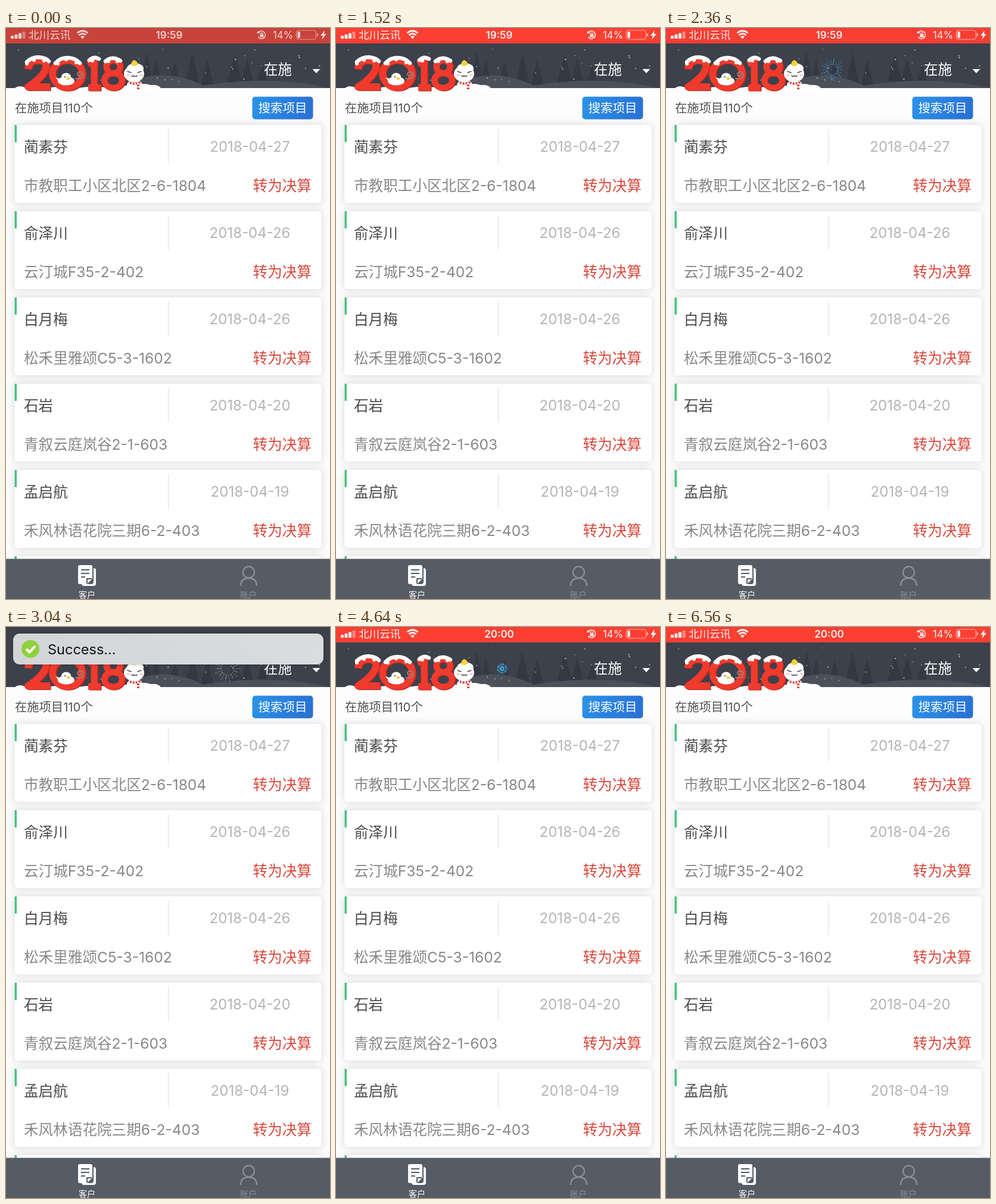
Recreate the animation shown at these times as an HTML page with a canvas. Size 544 by 960 pixels, loop 6.6 s.

```html
<!DOCTYPE html>
<html lang="zh">
<head>
<meta charset="utf-8">
<style>
html, body { margin: 0; width: 100%; height: 100%; overflow: hidden; background: #fdfdfd; }
canvas { display: block; }
</style>
</head>
<body>
<canvas width="544" height="960"></canvas>
<script>
const g = document.querySelector('canvas').getContext('2d');
const LOOP = 6600, TAU = Math.PI * 2;
const FONT = "Inter, 'Noto Sans CJK SC', 'Noto Sans CJK', sans-serif";
const projects = [
  ['蔺素芬', '2018-04-27', '市教职工小区北区2-6-1804'],
  ['俞泽川', '2018-04-26', '云汀城F35-2-402'],
  ['白月梅', '2018-04-26', '松禾里雅颂C5-3-1602'],
  ['石岩', '2018-04-20', '青叙云庭岚谷2-1-603'],
  ['孟启航', '2018-04-19', '禾风林语花院三期6-2-403']
];

const clamp = x => Math.max(0, Math.min(1, x));
const ease = x => x < .5 ? 2 * x * x : 1 - 2 * (1 - x) ** 2;
const rand = n => { const s = Math.sin(n * 127.1) * 43758.5; return s - Math.floor(s); };

function text(s, x, y, size, color, align = 'left', weight = 400) {
  g.font = `${weight} ${size}px ${FONT}`;
  g.fillStyle = color;
  g.textAlign = align;
  g.fillText(s, x, y);
}
function rect(x, y, w, h, color, r = 0) {
  g.fillStyle = color;
  g.beginPath();
  g.roundRect(x, y, w, h, r);
  g.fill();
}
function oval(x, y, rx, ry, color) {
  g.fillStyle = color;
  g.beginPath();
  g.ellipse(x, y, rx, ry, 0, 0, TAU);
  g.fill();
}
function fill(d, color) {
  g.fillStyle = color;
  g.fill(new Path2D(d));
}
function line(d, color, width) {
  g.strokeStyle = color;
  g.lineWidth = width;
  g.stroke(new Path2D(d));
}

function status(t, alpha) {
  const glow = clamp(t / 500);
  g.globalAlpha = alpha;
  rect(0, 0, 544, 26, `rgb(${200 + 53 * glow}, ${67 - 4 * glow}, ${59 - 9 * glow})`);
  g.globalAlpha = alpha * (.75 + .2 * glow);
  for (let i = 0; i < 4; i++)
    rect(8 + i * 6.5, 13 - i * 2.3, 5, 5 + i * 2.3, i < 3 ? '#fff' : '#ffffff70', 1);
  text('北川云讯', 38, 18, 17.6, '#fff');
  line('M119.500 8.500Q128.500 1 137.500 8.500M122.500 12Q128.500 7 134.500 12', '#fff', 2.8);
  fill('M125 14.500Q128.500 11.500 132 14.500L128.500 18.500Z', '#fff');
  text(t < 3500 ? '19:59' : '20:00', 274, 17.5, 17, '#fff', 'center', 600);
  line('M423.500 8A6.500 6.500 0 1 1 423.500 15', '#fff', 1.6);
  fill('M421 9H427L423 5Z', '#fff');
  rect(426.5, 10.5, 6, 5, '#fff', 1);
  line('M427.700 11V9Q429.500 6.500 431.300 9V11', '#fff', 1.2);
  text('14%', 448, 18, 16.8, '#fff');
  g.strokeStyle = '#ffffffa0';
  g.lineWidth = 1.2;
  g.beginPath();
  g.roundRect(487.5, 4, 33, 15, 4);
  g.stroke();
  rect(489.5, 6, 4.5, 11, '#fff', 2);
  rect(522, 9, 2, 5, '#ffffffa0', 1);
  fill('M535 4L528 13H532L530 20L538 10H534Z', '#fff');
  g.globalAlpha = 1;
}

function scenery() {
  rect(0, 0, 544, 101, '#3c414b');
  for (const [x, y, w] of [[236, 40, 24], [252, 52, 22], [283, 55, 22], [313, 41, 26],
                           [338, 53, 24], [384, 44, 30], [405, 52, 26], [430, 62, 24]])
    fill(`M${x} ${y}L${x + w / 2} 101H${x - w / 2}Z`, '#333842');
  fill('M190 101Q260 58 340 101ZM310 101Q430 76 544 101Z', '#4b5059');
  for (let i = 0; i < 34; i++) {
    const r = .6 + rand(i + 90) * .7;
    oval(8 + rand(i + 1) * 528, 32 + rand(i + 50) * 60, r, r, '#ffffffa0');
  }
}

// Each burst opens from its centre, then thins out into loose sparks.
function burst(x, y, size, start, life, colors, t) {
  const p = (t % 2540 - start) / life;
  if (p <= 0 || p >= 1) return;
  const r = size * Math.sin(Math.min(1, p * 1.5) * Math.PI / 2);
  g.save();
  g.translate(x, y);
  g.globalAlpha = clamp((1 - p) * 2.2);
  g.lineWidth = 1.4;
  g.setLineDash([3, 1.5]);
  for (let i = 0; i < 18; i++) {
    g.rotate(TAU / 18);
    g.strokeStyle = colors[i % colors.length];
    g.beginPath();
    g.moveTo(r * p * .6, 0);
    g.lineTo(i % 2 ? r : r * .85, 0);
    g.stroke();
  }
  g.restore();
}

function emblem() {
  // Ground snow
  fill('M14 102Q21 95 32 100Q48 97 64 102Q90 96 120 101Q150 96 180 102Q198 94 214 99Q230 91 243 96Q256 95 260 101L254 104Q238 108 226 104Q210 109 194 105Q150 108 102 106Q60 108 30 106Q20 106 14 102Z', '#fff');

  g.lineCap = 'butt';
  g.lineJoin = 'round';
  const two = 'M37 69Q38 54 54 54Q71 55 66 70Q60 84 37 99H74';
  const zero = 'M78 77a25 23 0 1 0 50 0a25 23 0 1 0 -50 0';
  const one = 'M137 60L148 56V99M138 100H159';
  const eight = 'M168.500 65a11.500 11 0 1 0 23 0a11.500 11 0 1 0 -23 0M165 88a15 12.500 0 1 0 30 0a15 12.500 0 1 0 -30 0';
  const digits = [[two, 12], [zero, 11.5], [one, 11], [eight, 10]];
  for (const [d, w] of digits) {
    g.save();
    g.translate(1.5, 1);
    line(d, '#b9271f', w);
    g.restore();
  }
  for (const [d, w] of digits) line(d, '#f03a2d', w);
  g.lineCap = 'round';
  line('M35 57Q43 49 55 49Q67 50 72 56M83 59Q91 50 103 50Q116 50 124 59M140 54Q148 47 156 52M167 56Q178 46 192 55',
    '#fff', 6.5);
  for (const [x, y] of [[35, 60], [47, 54], [64, 55], [87, 60], [101, 53], [118, 58], [145, 55], [172, 56], [187, 56]])
    oval(x, y, 3, 3, '#fff');

  // Bird and spiral
  oval(101, 89, 14, 7.5, '#fff');
  oval(101, 82, 8, 6.5, '#fff');
  fill('M83 83L96 87L91 93Z', '#fff');
  oval(99, 82, 1, 1.2, '#444');
  fill('M102 82L109 85L103 88Z', '#f7c928');
  line('M117 85Q129 87 130 79Q129 73 123 74Q118 76 121 80Q125 82 126 78', '#9d8581', 1.8);

  // Snowman
  oval(216, 96, 13, 9, '#fff');
  oval(215, 77, 17, 14, '#fff');
  oval(217, 68, 14, 9, '#fff');
  fill('M210 62Q211 54 216 54Q222 57 221 62Q215 66 210 62Z', '#f8d13a');
  line('M204 73L210 75M221 75L227 73M211 80Q213 83 215 80Q218 83 220 80', '#4b4b50', 1.5);
  oval(205, 79, 3, 1.5, '#f9c7c4');
  oval(227, 79, 3, 1.5, '#f9c7c4');
  g.lineCap = 'butt';
  const scarf = 'M206 91Q216 96 226 91M222 93V105';
  line(scarf, '#e2463d', 4);
  g.setLineDash([2, 3]);
  line(scarf, '#fff', 4);
  g.setLineDash([]);
}

function header(t) {
  scenery();
  burst(372, 70, 23, 40, 640, ['#c9ccd0', '#8f959e'], t);
  burst(332, 77, 20, 520, 640, ['#f0dfa0', '#d9b866', '#fff3cd'], t);
  burst(279, 70, 19, 1980, 540, ['#35a7e8', '#48d0c4', '#4376e6'], t);
  text('在施', 433, 78, 23.5, '#fff');
  fill('M514.500 69H527.500L521 76Z', '#fff');
}

function card(y, name, date, place) {
  g.save();
  g.shadowColor = '#00000026';
  g.shadowBlur = 13;
  rect(14, y, 516, 131, '#fff', 6);
  g.restore();
  rect(14.5, y, 3.5, 29, '#45c07d', 1);
  if (!name) return;
  rect(272, y + 7, 1, 58, '#dcdcde');
  text(name, 30, y + 45.5, 24.6, '#4a4a4c');
  text(date, 409.5, y + 45, 24, '#b5b5b9', 'center');
  text(place, 30, y + 111, 24.6, '#88888b');
  text('转为决算', 513, y + 111, 24.6, '#d9483b', 'right');
}

function content() {
  rect(0, 101, 544, 859, '#fdfdfd');
  text('在施项目110个', 15, 142, 20.3, '#505052');
  const blue = g.createLinearGradient(414, 115, 515, 153);
  blue.addColorStop(0, '#2b93e8');
  blue.addColorStop(1, '#2a6fd3');
  rect(413.5, 115.5, 102, 38, blue, 5);
  text('搜索项目', 464.5, 142, 20.5, '#fff', 'center');
  for (let i = 0; i < 6; i++) card(163 + i * 145, ...(projects[i] || []));
}

function tabs() {
  rect(0, 892.5, 544, 68, '#565c65');
  rect(127, 908, 24, 30, '#fff', 4);
  rect(120, 902, 27, 33, '#565c65', 4);
  fill('M124 903H142Q145 903 145 906V926L136 935H124Q121 935 121 932V906Q121 903 124 903Z', '#fff');
  line('M126 911H140M126 917H140M126 923H133M136 934V926H144', '#565c65', 2);
  text('客户', 136, 958, 14, '#fff', 'center', 500);
  g.strokeStyle = '#8a8f96';
  g.lineWidth = 2.3;
  g.beginPath();
  g.arc(407.5, 915, 9.5, 0, TAU);
  g.stroke();
  line('M394 938Q394 925 407.500 925Q421 925 421 938', '#8a8f96', 2.3);
  text('账户', 407, 958, 14, '#8a8f96', 'center');
}

function banner(shown) {
  g.save();
  g.translate(0, -75 * (1 - shown));
  g.shadowColor = '#00000040';
  g.shadowBlur = 5;
  const gray = g.createLinearGradient(12, 0, 533, 0);
  gray.addColorStop(0, '#d3d5d7');
  gray.addColorStop(1, '#dadcdf');
  rect(12, 11, 521, 52, gray, 11);
  g.shadowColor = 'transparent';
  oval(41, 37, 15, 15, '#8fd13f');
  line('M34 37L39.500 42.500L49 32', '#fff', 4);
  text('Success...', 70, 46, 23.5, '#111');
  g.restore();
}

function draw(t) {
  const shown = ease(clamp((t - 2334) / 200)) - ease(clamp((t - 4034) / 200));
  header(t);
  content();
  emblem();
  tabs();
  status(t, 1 - shown);
  if (shown > 0) banner(shown);
}

const start = performance.now();
function tick() {
  draw((performance.now() - start) % LOOP);
  requestAnimationFrame(tick);
}
tick();
</script>
</body>
</html>
```
